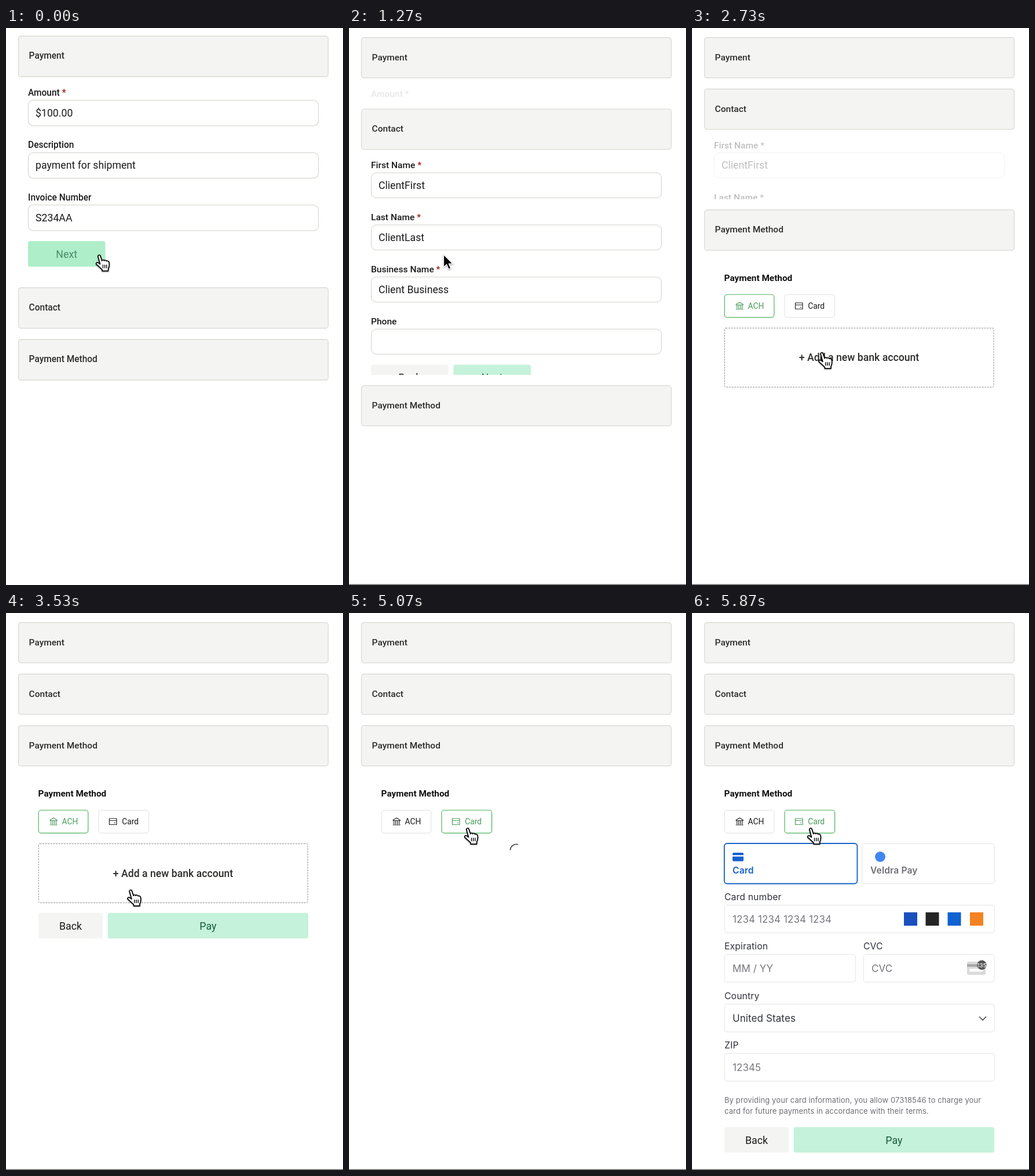
Write an HTML page that moves like this. It is 582 by 962 pixels and loops after 5940 ms.

```html
<!DOCTYPE html>
<html lang="en">
<head>
<meta charset="utf-8">
<title>Payment form</title>
<style>
html, body { margin: 0; width: 100%; height: 100%; overflow: hidden; background: #fff; }
#stage { display: block; width: 582px; height: 962px; }
text { font-family: Roboto, Arial, sans-serif; white-space: pre; }
.form text { font-family: Inter, "Open Sans", sans-serif; letter-spacing: .15px; }
.star { fill: #a3170f; }
.closing .star { fill: #333; }
.tab rect { fill: #fff; stroke: #dfdfdc; }
.tab text { fill: #1a1a1a; }
.tab path { fill: none; stroke: #222; stroke-width: 1.2; }
.tab.on rect { stroke: #4bb35b; stroke-width: 1.2; }
.tab.on text { fill: #489c5b; }
.tab.on path { stroke: #489c5b; }
.cursor { filter: drop-shadow(0 1.5px 1.2px rgba(0,0,0,.4)); }
</style>
</head>
<body>
<svg id="stage" viewBox="0 0 582 962" xmlns="http://www.w3.org/2000/svg"></svg>
<script>
const LOOP = 5940;
const BODY1 = 343, BODY2 = 432, BODY3 = 334;
const MINT = [197, 242, 218], HOVER = [174, 238, 201], PRESS = [157, 235, 189];
const INK = [23, 90, 55], FADED = [78, 138, 104];

// ---- markup helpers ----
const text = (x, y, s, size = 15.55, weight = 400, fill = '#1a1a1a', more = '') =>
  `<text x="${x}" y="${y}" font-size="${size}" font-weight="${weight}" fill="${fill}" ${more}>${s}</text>`;
const rect = (x, y, w, h, fill, stroke = 'none', rx = 4, more = '') =>
  `<rect x="${x}" y="${y}" width="${w}" height="${h}" rx="${rx}" fill="${fill}" stroke="${stroke}" ${more}/>`;
const mid = 'text-anchor="middle"';

const header = (id, label) => `<g id="${id}">` +
  rect(21.5, .5, 535, 69.6, '#f4f4f2', '#dadad4', 4.5, 'stroke-width="1.3"') +
  text(39.6, 39.7, label, 15.5, 500, '#2c2c2a') + '</g>';

const field = (y, h, label, value, required) =>
  text(38, y - 7.3, label + (required ? ' <tspan class="star">*</tspan>' : ''), 15.55, 500) +
  rect(38.5, y + .5, 501, h, '#fff', '#d0d0c8', 8.5) +
  text(51, y + h / 2 + 6.5, value, 17.7);

const button = (id, x, y, w, label, fill, ink) => `<g id="${id}">` +
  rect(x, y, w, 44, fill, 'none', 3.5) +
  text(x + w / 2, y + 28.7, label, 17.8, 400, ink, mid) + '</g>';

const plainButton = (x, y, w) => button('', x, y, w, 'Back', '#f4f4f2', '#1a1a1a');
const mintButton = (id, x, y, w, label) => button(id, x, y, w, label, '#c5f2da', '#175a37');

const tab = (id, x, w, label, icon) => `<g id="${id}" class="tab">` +
  rect(x, 340.5, w, 39.6, '', '', 4.5) +
  `<path transform="translate(${x} 340)" d="${icon}"/>` +
  `<text x="${x + 40.3}" y="364.8" font-size="13.8">${label}</text></g>`;

const bankIcon = 'M20 17.5 26 14l6 3.5v1H20zM21.5 19v6M24.5 19v6M27.5 19v6M30.5 19v6M19.5 26h13';
const cardIcon = 'M18.5 15h12.5v10.5H18.5zM18.5 18.5H31M26.5 22.5h2.5';

// ---- card entry form ----
const GREY = '#6d6e73', DARK = '#30313d';
const entry = (x, y, w, value, ink = '#75767c') =>
  rect(x + .3, y + .5, w, 48, '#fff', '#e4e4e4', 4.5) + text(x + 14, y + 31, value, 16.9, 400, ink);
const caption = (x, y, s) => text(x, y, s, 15.7, 400, DARK);
const mark = (x, fill) => rect(x, 517, 23, 23, fill, 'none', 0);

const cardForm = `<g id="form" class="form">` +
  rect(55.8, 398, 229.6, 69.5, '#fff', '#1864c4', 5, 'stroke-width="1.9"') +
  rect(70, 414, 19, 14.8, '#1560d0', 'none', 2) + rect(70, 418.2, 19, 2.4, '#fff', 'none', 0) +
  text(70, 449.7, 'Card', 15.6, 600, '#1560c8') +
  rect(293.5, 398.5, 229, 69, '#fff', '#e4e4e4', 4.5) +
  '<circle cx="325" cy="421" r="9" fill="#4285f4"/>' +
  text(308, 449.7, 'Veldra Pay', 15.6, 600, GREY) +
  caption(56, 496, 'Card number') + entry(56, 504, 466, '1234 1234 1234 1234') +
  mark(366, '#1a4fc0') + mark(403.5, '#252525') + mark(441.5, '#0f62d0') + mark(480, '#f58220') +
  caption(56, 581, 'Expiration') + entry(56, 589, 226, 'MM / YY') +
  caption(296, 581, 'CVC') + entry(296, 589, 226, 'CVC') +
  rect(475, 602, 32, 23, '#dadada', 'none', 3) + rect(475, 606.5, 32, 4.5, '#a8a8a8', 'none', 0) +
  rect(479, 614.5, 23, 5, '#fff', 'none', 1) +
  '<circle cx="500.5" cy="608" r="8.2" fill="#555"/>' +
  text(500.5, 611.6, '135', 9.5, 500, '#fff', mid) +
  caption(56, 666.5, 'Country') + entry(56, 675, 466, 'United States', DARK) +
  '<path d="M496 697l6 6.2 6-6.2" fill="none" stroke="#555" stroke-width="1.7"/>' +
  caption(56, 751.5, 'ZIP') + entry(56, 760, 466, '12345') +
  text(56, 845.5, 'By providing your card information, you allow 07318546 to charge your', 12.95, 400, GREY) +
  text(56, 864.5, 'card for future payments in accordance with their terms.', 12.95, 400, GREY) + '</g>';

// Nested svg elements clip the accordion bodies.
const body = (id, top, inner) => `<svg id="${id}" x="0" width="582" height="0">` +
  `<g id="${id}in" transform="translate(0 ${-top})">${inner}</g></svg>`;

const stage = document.getElementById('stage');
stage.innerHTML = '<rect width="582" height="962" fill="#fff"/><g id="page">' +
  header('head1', 'Payment') +
  body('body1', 87,
    field(126, 44, 'Amount', '$100.00', true) +
    field(216, 44, 'Description', 'payment for shipment') +
    field(306, 44, 'Invoice Number', 'S234AA') +
    mintButton('next1', 38, 368.5, 133.5, 'Next')) +
  header('head2', 'Contact') +
  body('body2', 176,
    field(215, 43.3, 'First Name', 'ClientFirst', true) +
    field(305, 43.3, 'Last Name', 'ClientLast', true) +
    field(395, 43.3, 'Business Name', 'Client Business', true) +
    field(485, 43.3, 'Phone', '') +
    plainButton(38, 547, 133.5) + mintButton('next2', 180.5, 547, 133.5, 'Next')) +
  header('head3', 'Payment Method') +
  body('body3', 265,
    text(55.6, 317, 'Payment Method', 15.35, 600, '#111') +
    tab('ach', 56.2, 85.6, 'ACH', bankIcon) + tab('card', 160, 86.6, 'Card', cardIcon) +
    '<g id="bank">' +
    rect(56.3, 398.5, 464.7, 102, '#fff', '#8c8c8c', 2, 'stroke-dasharray="3 1.6"') +
    text(288.5, 455.5, '+ Add a new bank account', 17.65, 500, '#2c2c2a', mid) + '</g>' +
    '<path id="spin" d="M297.7 404.1A10.5 10.5 0 0 1 292.6 419.9" fill="none" stroke="#555" stroke-width="1.9"/>' +
    '<g id="actions">' + plainButton(56, 518, 111) + mintButton('pay', 175.7, 518, 346.3, 'Pay') + '</g>' +
    cardForm) +
  '<rect y="960.6" width="582" height="1.4" fill="#6a6a6a"/></g>' +
  '<g id="hand" class="cursor"><g transform="translate(-7.2 -1) scale(1.06)" stroke="#000" stroke-linejoin="round">' +
  '<path fill="#fff" stroke-width="1.6" ' +
  'd="M4.8 3.6C4.3.9 7.8.2 8.7 2.7L11.3 10.4C11.7 8.5 14.3 8.5 14.9 10.3 15.7 8.9 18.1 9.2 18.6 11 19.8 10.2 22.2 10.6 22.8 13 23.7 16.8 23.6 19.6 21.5 23.6V27H11.6V24.8C8.2 22 5.2 18.9 2.6 16.6.6 14.7 2.8 12.2 5.2 13.6L8.2 15.8Z"/>' +
  '<path fill="none" stroke-width="1.3" d="M12.9 16.8v5.6M15.9 16.8v5.6M18.9 16.8v5.6"/></g></g>' +
  '<path id="arrow" class="cursor" fill="#000" stroke="#fff" stroke-width="1.4" d="M0 0V22L5.2 17.3 8.6 25.4 12.4 23.8 9.1 15.9H16Z"/>';

const el = {};
for (const n of stage.querySelectorAll('[id]')) el[n.id] = n;

// ---- timing helpers ----
const part = (t, a, b) => Math.min(1, Math.max(0, (t - a) / (b - a)));
const ease = p => p * p * (3 - 2 * p);
const span = (t, a, b) => ease(part(t, a, b));
const mix = (a, b, p) => a + (b - a) * p;
const rgb = (a, b, p) => `rgb(${a.map((v, i) => Math.round(mix(v, b[i], p)))})`;
const show = (n, on) => { n.style.display = on ? '' : 'none'; };
const shift = (n, x, y) => n.setAttribute('transform', `translate(${x} ${y})`);

function tint(n, hover, press) {
  n.firstChild.setAttribute('fill', press ? rgb(HOVER, PRESS, press) : rgb(MINT, HOVER, hover));
  n.lastChild.setAttribute('fill', rgb(INK, FADED, hover));
}
function place(id, y, h) {
  el[id].setAttribute('y', y);
  el[id].setAttribute('height', Math.max(0, h));
}

// time, x, y of the pointer
const path = [
  [0, 161, 392], [1860, 161.5, 391], [2400, 224.3, 560.5], [3190, 224.3, 560.5],
  [3330, 225, 582], [3730, 206, 376], [3800, 206, 376], [3930, 205, 371.5]
];
function pointer(t) {
  let i = path.length - 1;
  while (i && path[i][0] > t) i--;
  const a = path[i], b = path[i + 1] || a;
  const p = b === a ? 0 : span(t, a[0], b[0]);
  return [mix(a[1], b[1], p), mix(a[2], b[2], p)];
}

function draw(t) {
  const zoom = mix(1.0058, 1, span(t, 60, 470));
  el.page.setAttribute('transform', `translate(0 ${448 * (1 - zoom)}) scale(1 ${zoom})`);

  const q1 = span(t, 1030, 1330), q2 = span(t, 2535, 2835);
  const h1 = BODY1 * (1 - q1), h2 = BODY2 * q1 * (1 - q2);
  const y2 = 105 + h1, y3 = 194 + h1 + h2;
  shift(el.head1, 0, 16);
  shift(el.head2, 0, y2);
  shift(el.head3, 0, y3);
  place('body1', 87, h1);
  place('body2', y2 + 71, h2);
  place('body3', y3 + 71, q2 < 1 ? BODY3 * q2 : 720);
  el.body1in.setAttribute('opacity', 1 - q1);
  el.body2in.setAttribute('opacity', 1 - q2);
  el.body1in.classList.toggle('closing', q1 > 0);
  el.body2in.classList.toggle('closing', q2 > 0);

  const [x, y] = pointer(t);
  const overNext = t > 1870 && x > 181 && y > 547 ? 1 : 0;
  const overPay = t > 2835 && y >= 518 && y <= 562;
  tint(el.next1, 1, part(t, 930, 1000));
  tint(el.next2, overNext * part(t, 2180, 2330), part(t, 2440, 2520));

  // tabs and what hangs below them
  const card = t >= 4200, ready = t >= 5130;
  el.ach.classList.toggle('on', !card);
  el.card.classList.toggle('on', card);
  show(el.bank, !card);
  show(el.spin, card && !ready);
  el.spin.setAttribute('transform', `rotate(${(t - 4470) * .36} 289 410)`);
  show(el.actions, !card || ready);
  shift(el.actions, 0, ready ? mix(332, 370, span(t, 5270, 5400)) : 0);
  tint(el.pay, overPay ? part(t, 2835, 3000) : 0, 0);
  show(el.form, ready);
  el.form.setAttribute('opacity', part(t, 5160, 5460));

  let hand;
  if (t < 1870) hand = t < 1270;
  else if (t < 2835) hand = overNext;
  else hand = overPay || (y >= 398 && y <= 500) || y <= 380;
  show(el.hand, hand);
  show(el.arrow, !hand);
  shift(el.hand, x, y);
  shift(el.arrow, x + 2, y);
}

const start = performance.now();
function tick() {
  draw((performance.now() - start) % LOOP);
  requestAnimationFrame(tick);
}
tick();
</script>
</body>
</html>
```
